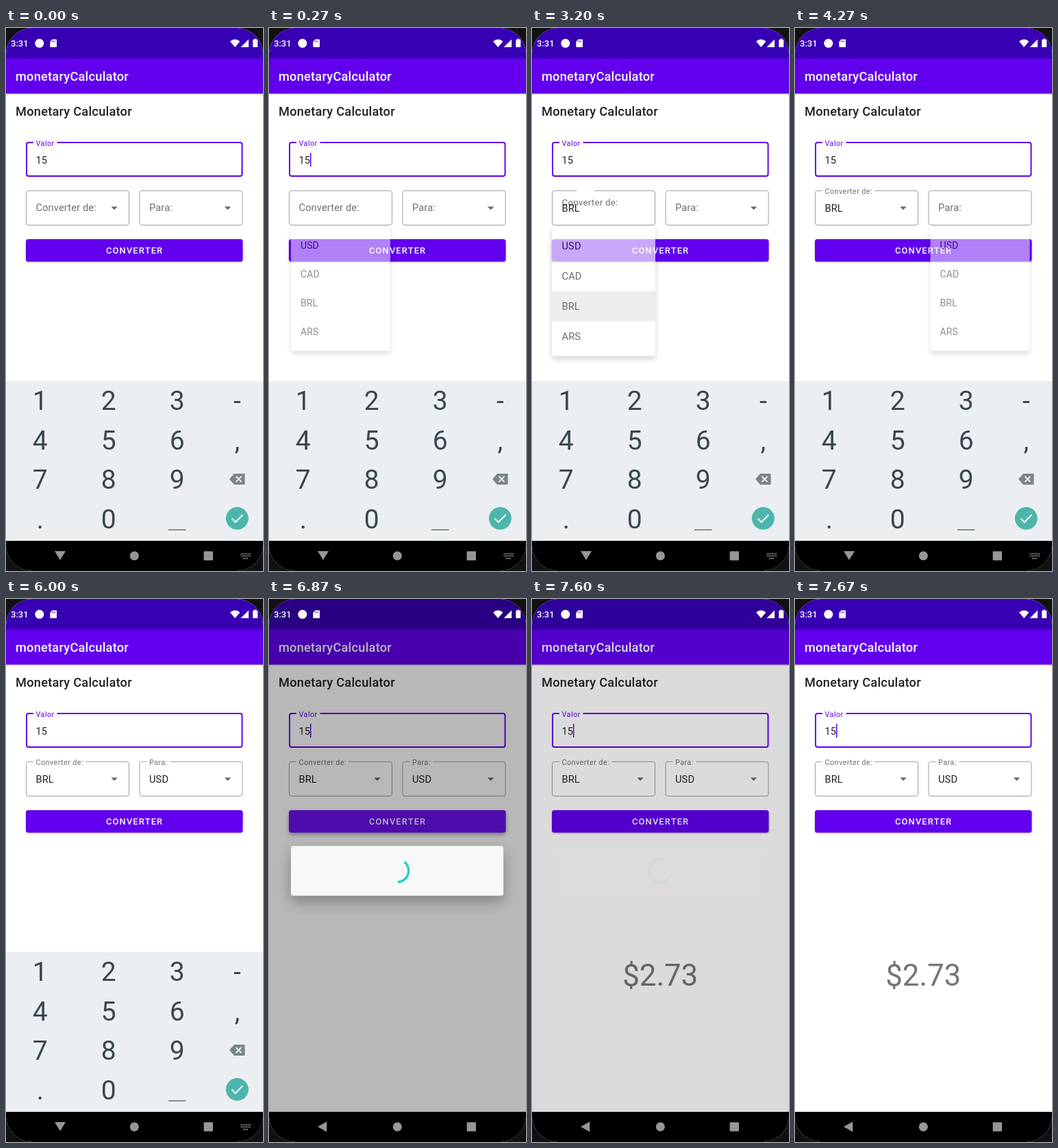
Animation of 375x792 px, one loop 8 s. Source, as an HTML page:

```html
<!DOCTYPE html>
<html lang="pt">
<head>
<meta charset="utf-8">
<title>Conversor</title>
<style>
  html, body { margin: 0; width: 100%; height: 100%; overflow: hidden; background: #111; }
  svg { display: block; width: 100vw; height: 100vh; font-family: Roboto, sans-serif; }
  .title { font-size: 18.2px; font-weight: 500; letter-spacing: .25px; }
  .body { font-size: 14.6px; letter-spacing: .14px; fill: #212121; }
  .caption { font-size: 10.95px; letter-spacing: .36px; }
  .outline { fill: none; stroke: #9e9e9e; }
  .keys text { font-size: 39px; text-anchor: middle; fill: #37474f; }
  .menu { filter: drop-shadow(0 4px 4px rgba(0, 0, 0, .28)); }
  #dialog { filter: drop-shadow(0 9px 10px rgba(0, 0, 0, .32)); }
</style>
</head>
<body>
<svg viewBox="0 0 375 792">
  <defs>
    <clipPath id="screen"><rect width="375" height="792" rx="38"/></clipPath>
    <clipPath id="above-nav"><rect width="375" height="748"/></clipPath>
    <clipPath id="button-clip"><rect x="29" y="308" width="316.5" height="33" rx="3.6"/></clipPath>
    <linearGradient id="bar-shadow" x2="0" y2="1">
      <stop stop-opacity=".2"/><stop offset="1" stop-opacity="0"/>
    </linearGradient>
  </defs>
  <g clip-path="url(#screen)">
    <rect width="375" height="792" fill="#fff"/>
    <rect y="95" width="375" height="3.5" fill="url(#bar-shadow)"/>
    <rect y="44" width="375" height="51.7" fill="#6200ee"/>
    <rect width="375" height="44.5" fill="#3700b3"/>
    <text class="title" x="14" y="77" fill="#fff">monetaryCalculator</text>
    <text class="title" x="14" y="128" fill="#212121">Monetary Calculator</text>

    <rect x="30" y="167" width="314.5" height="49" rx="3" fill="none" stroke="#6200ee" stroke-width="2"/>
    <rect x="40" y="165" width="34.5" height="4" fill="#fff"/>
    <text class="caption" x="43.5" y="171.5" fill="#6200ee">Valor</text>
    <text class="body" x="43.5" y="197.5">15</text>
    <rect id="cursor" x="60" y="182" width="1.5" height="20" fill="#6200ee"/>

    <g id="fields"></g>

    <rect id="button" x="29" y="308" width="316.5" height="32.8" rx="3.6" fill="#6200ee"/>
    <circle id="ripple" cx="187" cy="324.5" fill="#fff" clip-path="url(#button-clip)"/>
    <text x="146" y="329.3" font-size="12.8" font-weight="500" letter-spacing="1.2" fill="#fff">CONVERTER</text>
    <text id="result" x="187.2" y="564.2" font-size="43.8" text-anchor="middle" fill="#757575">$2.73</text>

    <g id="menus"></g>

    <g clip-path="url(#above-nav)">
      <g id="keyboard" class="keys">
        <rect y="514.5" width="375" height="2" opacity=".06"/>
        <rect y="516" width="375" height="232" fill="#eceff1"/>
        <g id="keys"></g>
        <rect x="237" y="731" width="25.5" height="1.8" fill="#78868c"/>
        <path d="M326 658l7-8h15.5v16H333z" fill="#78868c"/>
        <path d="M335.5 654l8 8m0-8l-8 8" stroke="#eceff1" stroke-width="1.8"/>
        <circle cx="337.3" cy="715.3" r="16.5" fill="#4db6ac"/>
        <path d="M329.5 715.5l5.3 5.3 10.5-10.8" fill="none" stroke="#fff" stroke-width="1.9"/>
      </g>
    </g>

    <rect id="dim" width="375" height="748"/>
    <g id="dialog">
      <rect x="31" y="360" width="312" height="73" rx="3.6" fill="#fff"/>
      <path id="spinner" fill="none" stroke="#14d3c7" stroke-width="3.4"/>
    </g>

    <g fill="#fff">
      <text x="7" y="27" font-size="13" font-weight="500">3:31</text>
      <circle cx="48.8" cy="22.3" r="6.5"/>
      <path d="M67.5 16.5H73q1 0 1 1v9.6q0 1-1 1h-7.7q-1 0-1-1v-7z"/>
      <path d="M67.3 18.5v2m2-2v2m2-2v2" stroke="#3700b3"/>
      <path d="M327 19.5q7.2-5.8 14.4 0L334.2 28z"/>
      <path d="M342.5 28L354 16.5V28z"/>
      <path d="M362 17v-1.3h3.4V17h1.8v11h-7V17z"/>
    </g>

    <rect y="748" width="375" height="44"/>
    <g fill="#969696">
      <path id="back"/>
      <circle cx="187.3" cy="769.8" r="6.6"/>
      <rect x="288.6" y="763.2" width="13.4" height="13.4" rx=".8"/>
      <path id="ime" d="M342.5 767h14.5M342.5 770h14.5M346 773.6h7.5" stroke="#969696" stroke-width="1.7" stroke-dasharray="1.8 .75"/>
    </g>
  </g>
</svg>
<script>
const FRAME = 8000 / 120;
const $ = id => document.getElementById(id);
const set = (el, attrs) => { for (const k in attrs) el.setAttribute(k, attrs[k]); };
const mix = (a, b, p) => a + (b - a) * p;
const clamp = v => Math.max(0, Math.min(1, v));

// Last value whose frame has been reached: [frame, value], ...
const hold = (n, ...steps) => steps.reduce((v, [at, next]) => n >= at ? next : v, steps[0][1]);

const TOP = 288.5, ROW = 43.8, PAD = 7.9;
const currencies = ['USD', 'CAD', 'BRL', 'ARS'];
const selects = [
  { x: 29, label: 'Converter de:', gap: 76, pick: 2, closing: 47,
    alpha: [[0, 0], [3, .2], [4, .5], [36, .82], [37, 1], [48, .66], [49, .33], [50, 0]],
    // negative values point the arrow up
    arrow: [[0, 1], [3, .4], [4, 0], [36, -1], [48, 0], [49, 1]] },
  { x: 194.5, label: 'Para:', gap: 34, pick: 0, closing: 81,
    alpha: [[0, 0], [62, .08], [63, .25], [64, .5], [65, .82], [66, 1], [82, .66], [83, .33], [84, 0]],
    arrow: [[0, 1], [61, .6], [62, .3], [63, 0], [65, -1], [82, 0], [83, 1]] }
];

selects.forEach((s, i) => {
  const textX = s.x + 14.5;
  $('fields').insertAdjacentHTML('beforeend', `
    <rect class="outline" x="${s.x + .5}" y="237.3" width="150" height="50.2" rx="3.4"/>
    <rect id="gap${i}" y="236" height="3" fill="#fff"/>
    <text id="label${i}" x="${textX}" fill="#707070">${s.label}</text>
    <text id="value${i}" class="body" x="${textX}" y="268">${currencies[s.pick]}</text>
    <path id="arrow${i}" d="M-4.7-2.4h9.4L0 2.4z" fill="#666"/>`);
  const rows = currencies.map((c, r) =>
    `<text class="body" x="${textX}" y="${TOP + PAD + ROW * (r + .5) + 4.9}">${c}</text>`).join('');
  $('menus').insertAdjacentHTML('beforeend', `
    <g id="menu${i}" class="menu">
      <rect x="${s.x}" y="${TOP}" width="151" height="190" rx="3.6" fill="#fff"/>
      <rect id="press${i}" x="${s.x}" y="${TOP + PAD + ROW * s.pick}" width="151" height="${ROW}" opacity=".1"/>
      ${rows}
    </g>`);
});

['123-', '456,', '789', '.0'].forEach((row, r) => [...row].forEach((key, c) =>
  $('keys').insertAdjacentHTML('beforeend',
    `<text x="${[49.8, 149.8, 249.8, 337.3][c]}" y="${557.2 + r * 57.6}">${key}</text>`)));

function drawSelect(s, i, n) {
  const alpha = hold(n, ...s.alpha), arrow = hold(n, ...s.arrow);
  const float = clamp((n - s.closing) / 3);
  const scale = n < s.closing ? .92 + .08 * alpha : 1;
  const mid = s.x + 75.5, gap = s.gap * float;
  set($('gap' + i), { x: s.x + 11 + (s.gap - gap) / 2, width: gap });
  set($('label' + i), {
    y: mix(267, 242, float), 'font-size': mix(14.6, 10.95, float), 'letter-spacing': mix(.14, .36, float)
  });
  set($('value' + i), { opacity: float > 0 ? 1 : 0 });
  set($('arrow' + i), {
    opacity: Math.abs(arrow),
    transform: `translate(${s.x + 129} 262.8) scale(1 ${arrow < 0 ? -1 : 1})`
  });
  set($('menu' + i), {
    opacity: alpha,
    transform: `translate(${mid} ${TOP}) scale(${scale}) translate(${-mid} ${-TOP})`
  });
  set($('press' + i), { visibility: n >= s.closing ? 'visible' : 'hidden' });
}

function arc(start, sweep) {
  const point = deg => {
    const a = deg * Math.PI / 180;
    return `${187.3 + 16.6 * Math.cos(a)} ${396.3 + 16.6 * Math.sin(a)}`;
  };
  return `M${point(start)}A16.6 16.6 0 ${sweep > 180 ? 1 : 0} 1 ${point(start + sweep)}`;
}

function draw(n) {
  selects.forEach((s, i) => drawSelect(s, i, n));

  const visible = hold(n, [0, 0], [3, 1], [45, 0], [52, 1], [60, 0], [67, 1], [75, 0], [82, 1], [90, 0], [97, 1]);
  set($('cursor'), { opacity: visible });

  const press = clamp((n - 97) / 4);
  set($('ripple'), { r: 170 * press, opacity: n < 105 ? .24 * (1 - clamp((n - 100) / 4)) : 0 });
  const raised = n > 97 && n < 112;
  $('button').style.filter = raised
    ? 'drop-shadow(0 3px 3px rgba(0,0,0,.35))' : 'drop-shadow(0 1px 1px rgba(0,0,0,.28))';

  const slide = clamp((n - 99) / 4);
  set($('keyboard'), { transform: `translate(0 ${234 * slide * slide})` });
  const typing = n < 100;
  set($('back'), { d: typing ? 'M71 763h16l-8 13z' : 'M71 769.8l13.3-7.5v15z' });
  set($('ime'), { opacity: typing ? 1 : 0 });

  set($('dim'), { opacity: hold(n, [0, 0], [100, .06], [101, .14], [102, .22], [103, .28], [104, .32],
    [112, .28], [113, .21], [114, .14], [115, 0]) });
  const shown = hold(n, [0, 0], [101, .3], [102, .65], [103, .9], [104, 1],
    [112, .7], [113, .3], [114, .04], [115, 0]);
  const grow = n < 104 ? .94 + .06 * shown : 1;
  set($('dialog'), {
    opacity: shown,
    transform: `translate(187 396.5) scale(${grow}) translate(-187 -396.5)`
  });
  const turn = ((n > 109 && n < 112 ? 109 : n) - 105) / 9;
  set($('spinner'), { d: arc(-38 + 63 * turn, 163 + 107 * turn) });
  set($('result'), { opacity: n >= 112 ? 1 : 0 });
}

const start = performance.now();
let last = -1;
function tick() {
  const n = Math.floor(((performance.now() - start) % 8000 + 5) / FRAME) % 120;
  if (n !== last) draw(last = n);
  requestAnimationFrame(tick);
}
tick();
</script>
</body>
</html>
```
